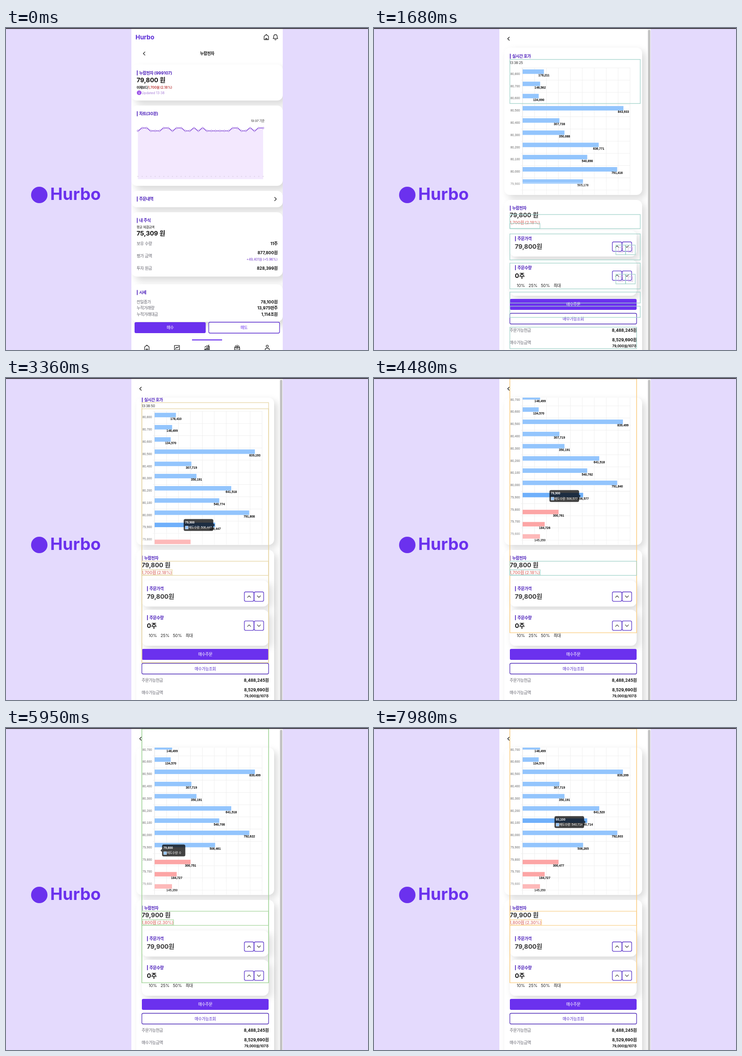
An HTML page with a canvas for the animation above (8000 ms loop, 794 by 706 pixels).

```html
<!DOCTYPE html>
<html lang="ko">
<head>
<meta charset="utf-8">
<title>Stock order</title>
<style>
html, body { margin: 0; width: 100%; height: 100%; overflow: hidden; background: #e4dafd; }
canvas { display: block; width: 794px; height: 706px; }
</style>
</head>
<body>
<canvas id="stage" width="794" height="706"></canvas>
<script>
const ctx = document.getElementById('stage').getContext('2d');
const LOOP = 8000, STEP = 70;
const UI = 'Inter, "Noto Sans CJK KR", "Noto Sans CJK", sans-serif';
const CHART = '"Liberation Sans", Arial, sans-serif';
const PURPLE = '#6b31ee', HEAD = '#4c1fbb', INK = '#111', GRAY = '#666670';
const TEAL = '#a3d3cb', ORANGE = '#fad391', GREEN = '#a9d8a0', SAND = '#e6d6a6';
const BRAND = 'Hurbo', STOCK = '누람전자';

const clamp = v => Math.max(0, Math.min(1, v));
const mix = (a, b, u) => a + (b - a) * u;
const comma = n => Math.round(n).toString().replace(/\B(?=(\d{3})+$)/g, ',');

// Hangul runs are set a little tighter than Latin ones.
function text(str, x, y, size, weight = 400, color = INK, align = 'left', family = UI) {
  ctx.font = `${weight} ${size}px ${family}`;
  ctx.fillStyle = color;
  const runs = str.match(/[가-힣]+|[^가-힣]+/g).map(s => {
    const gap = /[가-힣]/.test(s) ? `${-0.06 * size}px` : '0px';
    ctx.letterSpacing = gap;
    return { s, gap, w: ctx.measureText(s).width };
  });
  const total = runs.reduce((sum, r) => sum + r.w, 0);
  if (align === 'right') x -= total;
  if (align === 'center') x -= total / 2;
  for (const r of runs) {
    ctx.letterSpacing = r.gap;
    ctx.fillText(r.s, x, y + size * 0.36);
    x += r.w;
  }
  ctx.letterSpacing = '0px';
}

function rect(x, y, w, h, color) {
  ctx.fillStyle = color;
  ctx.fillRect(x, y, w, h);
}

function box(x, y, w, h, r, fill, stroke, lw = 1.3) {
  ctx.beginPath();
  ctx.roundRect(x, y, w, h, r);
  if (fill) { ctx.fillStyle = fill; ctx.fill(); }
  if (stroke) { ctx.strokeStyle = stroke; ctx.lineWidth = lw; ctx.stroke(); }
}

function card(x, y, w, h, off = 7) {
  ctx.save();
  ctx.shadowColor = 'rgba(0,0,0,0.15)';
  ctx.shadowOffsetX = ctx.shadowOffsetY = off;
  ctx.shadowBlur = 16;
  box(x, y, w, h, 12, '#fff');
  ctx.restore();
}

function path(d, x, y, color = '#222', lw = 1.3) {
  ctx.save();
  ctx.translate(x, y);
  ctx.strokeStyle = color;
  ctx.lineWidth = lw;
  ctx.lineCap = ctx.lineJoin = 'round';
  ctx.stroke(new Path2D(d));
  ctx.restore();
}

function heading(str, x, y) {
  rect(x, y - 5.5, 1.6, 11, HEAD);
  text(str, x + 5, y, 9, 700, HEAD);
}

function outline(x1, y1, x2, y2, color, lw = 1.3) {
  ctx.strokeStyle = color;
  ctx.lineWidth = lw;
  ctx.strokeRect(x1, y1, x2 - x1, y2 - y1);
}

const HOME = 'M-4.8 5.5V-1.8L0 -5.8L4.8 -1.8V5.5H-4.8M-1.5 5.5V3H1.5V5.5';
const BELL = 'M-5 3.2C-3.4 1.6 -4 -1 -3.6 -2.6C-2.6 -6.6 2.6 -6.6 3.6 -2.6C4 -1 3.4 1.6 5 3.2ZM-1.6 5.2Q0 6.6 1.6 5.2';
const NAV = [
  HOME,
  'M-5.5 -4.8H5.5V4.8H-5.5ZM-3.2 2L-1 -1L.8 .6L3.4 -2.2',
  'M-5 5V2.5H-3V5ZM-1 5V0H1V5ZM3 5V-3H5V5ZM-5 -1L-1 -4L1 -3L4 -6',
  'M-5.5 0H-2.2Q0 3 2.2 0H5.5V5H-5.5ZM-5.5 0L-3.6 -4H-2.5M5.5 0L3.6 -4H2.5M0 -6V-1M-1.8 -2.6L0 -.8L1.8 -2.6',
  'M0 -5.6A2.4 2.4 0 1 0 .01 -5.6M-4.5 6V4Q-4.5 1.4 -2 1.4H2Q4.5 1.4 4.5 4V6'
];

function lineChart() {
  const pts = [...'011000110110010100000011001011'].map((c, i) => [289.3 + i * 9.47, c === '1' ? 219.3 : 225.5]);
  const trace = () => {
    ctx.beginPath();
    ctx.moveTo(...pts[0]);
    for (let i = 1; i < pts.length; i++) {
      const [x, y] = pts[i], [px, py] = pts[i - 1];
      ctx.bezierCurveTo(px + 3, py, x - 3, y, x, y);
    }
  };
  trace();
  ctx.lineTo(564, 331.5);
  ctx.lineTo(289.3, 331.5);
  ctx.fillStyle = '#f3e8fe';
  ctx.fill();
  for (const [x] of pts) box(x - 1.3, 324.5, 2.6, 2, 1, '#ddd3e6');
  trace();
  ctx.strokeStyle = '#8850d8';
  ctx.lineWidth = 1.5;
  ctx.stroke();
  for (const [x, y] of pts) {
    ctx.beginPath();
    ctx.arc(x, y, 1.7, 0, 7);
    ctx.fillStyle = '#fff';
    ctx.fill();
    ctx.lineWidth = 0.9;
    ctx.stroke();
  }
}

function detailPage() {
  for (const [y, h] of [[80, 79], [170, 176], [357, 36], [404, 141], [562, 82]]) card(275, y, 332, h, 9);
  text(BRAND, 284, 20, 13.6, 700, '#5a2bd6');
  path(HOME, 571, 20);
  path(BELL, 591, 20);
  path('M1.8 -3.6L-1.8 0L1.8 3.6', 303, 56);
  text(STOCK, 441, 56, 9, 600, INK, 'center');

  heading(`${STOCK} (999107)`, 287, 98.5);
  text('79,800 원', 286.5, 114, 13.6, 700);
  text('어제보다', 286.5, 130.5, 7.2, 600, '#222');
  text('1,700원 (2.18%)', 311.5, 130.5, 7.2, 600, '#b83232');
  box(287, 137, 10, 10, 5, '#9b52e8');
  rect(291.4, 141.3, 1.2, 3.4, '#fff');
  rect(291.4, 139.2, 1.2, 1.2, '#fff');
  text('Updated 13:38', 297.5, 142, 7.3, 400, '#a87fd8');

  heading('차트(30분)', 287, 188);
  text('13:37 기준', 567, 203.5, 6.6, 500, '#333', 'right');
  lineChart();

  heading('주문내역', 287, 375);
  path('M-1.8 -3.8L2 0L-1.8 3.8', 591, 375);

  heading('내 주식', 287, 422);
  text('평균 체결금액', 286.5, 436, 7.2, 500, '#222');
  text('75,309 원', 286.5, 450.5, 13.6, 700);
  const rows = [['보유 수량', '11주', 473, 473], ['평가 금액', '877,800원', 500, 493],
    ['투자 원금', '828,399원', 526.5, 526.5], ['전일종가', '78,100원', 601, 601],
    ['누적거래량', '13,975만주', 614, 614], ['누적거래대금', '1,114조원', 627.5, 627.5]];
  for (const [name, value, y1, y2] of rows) {
    text(name, 286.5, y1, 9, 400, GRAY);
    text(value, 595.5, y2, 9, 700, INK, 'right');
  }
  text('+49,401원 (+5.96%)', 595.5, 507.5, 7.2, 400, '#7038c8', 'right');
  heading('시세', 287, 580);

  box(282, 645, 156, 24, 3, PURPLE);
  text('매수', 360, 657, 9, 500, '#fff', 'center');
  box(444.7, 645, 155.3, 24, 3, '#fff', '#5a2bd0');
  text('매도', 522, 657, 9, 500, PURPLE, 'center');
  rect(275, 672, 332, 34, '#fff');
  rect(408, 682.8, 66, 2.2, PURPLE);
  NAV.forEach((d, i) => path(d, 309 + i * 66, 701));
}

// Order book: sell rows first, then buy rows.
const BOOK = [
  [1680, [178211, 146562, 134690, 843933, 307738, 350088, 636771, 540898, 791416, 505178, 300590, 184720, 145350]],
  [3360, [178410, 146499, 134570, 839193, 307719, 350191, 641518, 540774, 791808, 506447, 300641, 184720, 145350]],
  [4410, { 3: 839499, 7: 540762, 8: 791840, 9: 506577, 10: 300761, 11: 184726 }],
  [5880, { 7: 540708, 8: 792622, 9: 506461, 10: 300751, 11: 184727 }],
  [6930, { 3: 839399, 6: 641520, 7: 540725, 8: 792577, 9: 506271, 10: 300578 }],
  [7350, { 7: 540714, 8: 792603, 9: 506265, 10: 300477 }]
];
for (let i = 2; i < BOOK.length; i++) BOOK[i][1] = Object.assign([...BOOK[i - 1][1]], BOOK[i][1]);

function volumes(t) {
  const q = 1680 + Math.floor((t - 1680) / 210) * 210;
  let i = BOOK.length - 1;
  while (i > 0 && BOOK[i][0] > q) i--;
  const [t0, a] = BOOK[i], [t1, b] = BOOK[i + 1] || [LOOP, a];
  const u = clamp((q - t0) / (t1 - t0));
  return a.map((v, k) => mix(v, b[k], u));
}

function scrollAt(t) {
  if (t < 3360) return 14.5 * clamp((t - 3150) / 210);
  const u = clamp((t - 3360) / 770);
  return mix(14.5, 80, 1 - (1 - u) ** 2);
}

// Pointer stops: time and row; 'buy' is the bid bar of row 10.
const HOVER = [[2520, 5], [2660, 7], [2870, 9], [3640, 10], [4293, 9], [4760, 8], [5100, 7], [5450, 6],
  [5794, 10], [6350, 9], [6620, 10], [6900, 'buy'], [7350, 10], [7759, 7]];

const rowY = i => 100.5 + 26.77 * i;
const barEnd = v => 326 + v * 26.2 / 1e5;
const barY = i => rowY(i) + (i > 9 ? 5.6 : -4.8);

function tipSpot(row, vol) {
  if (row === 'buy') return { x: barEnd(vol[10]) + 3, y: barY(10), w: 59, left: true };
  if (row === 10) return { x: 329, y: rowY(10) - 4.8, w: 51, left: true };
  return { x: barEnd(vol[row]) - 69, y: barY(row), w: 65, left: false };
}

function hoverAt(t) {
  let i = HOVER.length - 1;
  while (i >= 0 && HOVER[i][0] > t) i--;
  return i;
}

function tooltip(t, vol) {
  const i = hoverAt(t);
  if (i < 0) return;
  const [t0, row] = HOVER[i];
  const to = tipSpot(row, vol), from = i ? tipSpot(HOVER[i - 1][1], vol) : to;
  const u = 1 - (1 - clamp((t - t0) / 400)) ** 4;
  const x = mix(from.x, to.x, u), y = mix(from.y, to.y, u), w = to.w;
  const edge = to.left ? x : x + w, tip = to.left ? x - 3.5 : x + w + 3.5;
  ctx.globalAlpha = i ? 1 : clamp((t - t0) / 200);
  const dark = 'rgba(0,0,0,0.74)';
  box(x, y - 13, w, 26, 3.5, dark);
  ctx.beginPath();
  ctx.moveTo(edge, y - 3.5);
  ctx.lineTo(tip, y);
  ctx.lineTo(edge, y + 3.5);
  ctx.fill();
  const n = row === 'buy' ? 10 : row;
  text(comma(80800 - n * 100), x + 3, y - 6, 6.8, 700, '#fff', 'left', CHART);
  box(x + 3.5, y + 2.5, 6.5, 6.5, 0, '#93c5fd', '#fff', 0.6);
  text('매도수량: ' + (n === 10 ? 0 : comma(vol[n])), x + 11, y + 5.5, 6.7, 400, '#fff', 'left',
    '"Liberation Sans", "Noto Sans CJK KR", "Noto Sans CJK", sans-serif');
  ctx.globalAlpha = 1;
}

function orderBook(t, vol) {
  const h = hoverAt(t), hot = h < 0 ? -1 : HOVER[h][1];
  const top = rowY(0) - 13.4;
  for (let i = 0; i < 10; i++) rect(325.5 + i * 26.2, top, 0.8, 400, i ? '#ececec' : '#d8d8d8');
  for (let i = 0; i < 15; i++) rect(322, top + i * 26.77, 240, 0.8, '#ececec');
  vol.forEach((v, i) => {
    const buy = i > 9, on = hot === i && !buy || hot === 'buy' && i === 10;
    const color = buy ? (on ? '#fa8080' : '#fca5a5') : (on ? '#6fb0fb' : '#93c5fd');
    const y = barY(i), end = barEnd(v);
    rect(326, y - 4.9, end - 326, 9.8, color);
    text(comma(v), end, y + 8, 6.8, 700, '#000', 'center', CHART);
    text(comma(80800 - i * 100), 320, rowY(i), 6.8, 400, '#666', 'right', CHART);
  });
}

function stepper(y) {
  box(522.7, y - 10.3, 21, 20.6, 3, '#fff', '#5a35c8');
  box(544.2, y - 10.3, 21, 20.6, 3, '#fff', '#5a35c8');
  path('M-3.5 1.8L0 -1.8L3.5 1.8', 533.2, y, '#333', 1.1);
  path('M-3.5 -1.8L0 1.8L3.5 -1.8', 554.7, y, '#333', 1.1);
}

function loadOutlines() {
  for (const [y1, y2] of [[69, 165.5], [409, 440], [451.5, 508.5], [515.5, 572], [579, 603], [610, 634.5]])
    outline(298, y1, 584, y2, TEAL);
  outline(298, 428.5, 364, 439.5, TEAL);
  outline(298, 656, 576, 703, TEAL);
  for (const y of [476, 540]) for (const x of [530.5, 552]) {
    outline(x, y, x + 21, y + 21, TEAL);
    outline(x + 5.5, y + 5.5, x + 15.5, y + 15.5, '#d0b8dc', 1);
  }
}

function liveOutlines(t, scroll, up) {
  if (t < 2100) return;
  let color = ORANGE;
  if (t < 2520) color = TEAL;
  else if (t < 3500) color = SAND;
  else if (t >= 5250 && t < 6300) color = GREEN;
  ctx.save();
  ctx.beginPath();
  ctx.rect(275, 2, 325, 704);
  ctx.clip();
  outline(298, 68.5 - scroll, 576, 638.5 - scroll, color);
  outline(298, 82 - scroll, 576, 638.5 - scroll, color);
  ctx.restore();
  const info = t >= 4200 && t < 5040 ? TEAL : color;
  outline(298, 401.7, 576, 432.7, info);
  outline(298, 420.5, up ? 367.5 : 364.5, 432, info);
  if ([5250, 6300, 7210].some(s => t >= s && t < s + 140)) outline(298, 656, 576, 703, color);
}

function tradePage(t) {
  const early = t < 1680, blank = t < 1540;
  const wide = early ? 8 : 0, dy = early ? 7.5 : 0;
  const scroll = scrollAt(t), vol = volumes(t);
  const up = t >= 5250 && t < 6300 || t >= 7770;
  const orderUp = t >= 5250 && t < 6300;

  card(286, 43, 302 + wide, 323);
  card(286, 377, 302 + wide, 400);
  path('M1.8 -3.6L-1.8 0L1.8 3.6', 295, 23.5, '#222', 1.4);
  if (blank) return;

  ctx.save();
  ctx.beginPath();
  ctx.rect(286, 43, 302, 322);
  ctx.clip();
  ctx.translate(0, -scroll);
  heading('실시간 호가', 298, 62);
  if (!early) {
    const sec = Math.min(59, Math.floor(25 + (t - 1680) / 67.2 + 1e-6));
    text('13:38:' + sec, 297.5, 76, 7.2, 400, '#222');
    orderBook(t, vol);
  }
  ctx.restore();
  rect(290, 338, 290, 27, 'rgba(255,255,255,0.22)');
  if (!early) {
    ctx.save();
    ctx.translate(0, -scroll);
    tooltip(t, vol);
    ctx.restore();
  }

  heading(STOCK, 298, 395);
  ctx.save();
  ctx.translate(0, dy);
  text(up ? '79,900 원' : '79,800 원', 297.5, 410.5, 13.6, 700, '#333');
  text(up ? '1,800원 (2.30%)' : '1,700원 (2.18%)', 297.5, 426.5, 9, 600, '#e0807a');
  card(298, 444, 278 + wide, 57, 6);
  card(298, 508, 278 + wide, early ? 57 : 79, 6);
  heading('주문가격', 309.5, 462);
  text(orderUp ? '79,900원' : '79,800원', 309, 479, 13.6, 700, '#3a3a3a');
  heading('주문수량', 309.5, 525.5);
  text('0주', 309, 543, 13.6, 700);
  ctx.translate(wide, 0);
  stepper(479.3);
  stepper(543);
  ctx.restore();
  if (!early) [['10%', 313], ['25%', 339], ['50%', 366], ['최대', 394]].forEach(([s, x]) => text(s, x, 565, 9, 400, '#222'));

  const by = early ? -15 : 0;
  box(298, 594 + by, 278 + wide, 24, 3, PURPLE);
  text('매수주문', 437 + wide / 2, 606 + by, 9, 500, '#fff', 'center');
  box(298, 625.5 + by, 278 + wide, 23.5, 3, '#fff', '#4f2cb8');
  text('매수가능조회', 437 + wide / 2, 637.3 + by, 9, 500, '#5a30cc', 'center');

  if (early) return;
  text('주문가능현금', 297.5, 663, 9, 400, GRAY);
  text('매수가능금액', 297.5, 690, 9, 400, GRAY);
  text('8,488,245원', 576, 663, 9, 700, INK, 'right');
  text('8,529,690원', 576, 683.5, 9, 700, INK, 'right');
  text('79,000원/107주', 576, 697.5, 7.3, 700, INK, 'right');

  rect(599.5, 2, 7.5, 704, '#f8f8f8');
  box(601, 4, 5, 710, 2.5, '#c2c2c2');
  if (t < 1960) loadOutlines();
  liveOutlines(t, scroll, up);
}

function draw(t) {
  rect(0, 0, 794, 706, '#e4dafd');
  ctx.beginPath();
  ctx.arc(73, 366, 18, 0, 7);
  ctx.fillStyle = PURPLE;
  ctx.fill();
  text(BRAND, 97, 364, 36.5, 700, PURPLE);
  ctx.save();
  ctx.beginPath();
  ctx.rect(275, 0, 332, 706);
  ctx.clip();
  rect(275, 0, 332, 706, '#fff');
  if (t < 1400) detailPage(); else tradePage(t);
  ctx.restore();
  rect(0, 0, 794, 2, '#3a363f');
}

const start = performance.now();
function tick() {
  const t = (performance.now() - start) % LOOP;
  draw(Math.floor(t / STEP) * STEP);
  requestAnimationFrame(tick);
}
tick();
</script>
</body>
</html>
```
